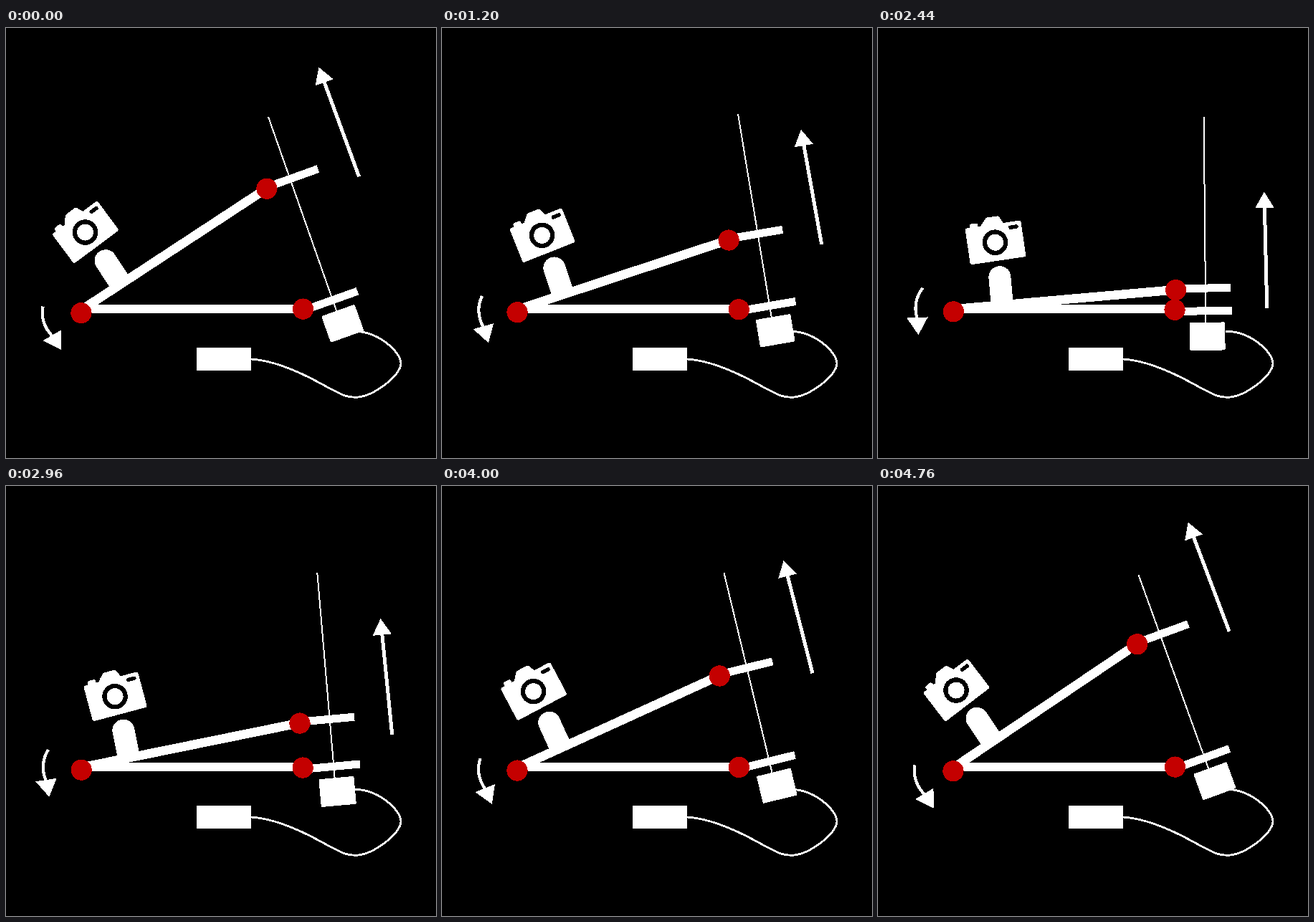
Write an HTML page that moves like this. It is 600 px wide and 600 px high and loops after 4800 ms.

```html
<!DOCTYPE html>
<html lang="en">
<head>
<meta charset="utf-8">
<title>Hinged arm with camera</title>
<style>
  html, body { margin: 0; width: 100%; height: 100%; overflow: hidden; background: #000; }
  svg { display: block; width: 100%; height: 100%; fill: #fff; shape-rendering: crispEdges; }
  .line { fill: none; stroke: #fff; }
  .joint { fill: #c40000; }
  .hole { fill: #000; }
</style>
</head>
<body>
<svg viewBox="0 0 600 600">
  <!-- fixed parts -->
  <rect x="105" y="386" width="309" height="12"/>
  <rect x="266" y="446" width="76" height="32" rx="1.5"/>
  <path class="line" stroke-width="2.8" d="M342 462C375 464 410 480 440 496.5S475 515.3 489 515.3C513 514 551 485 551 468S517 422 485 423.5"/>

  <!-- motor, rod and lower bracket -->
  <g id="lower">
    <path class="line" stroke-width="2" d="M47.9-266.6L46.4 24"/>
    <rect x="24" y="20.3" width="49.2" height="39" rx="1.5"/>
    <rect x="5" y="-1.2" width="78.3" height="11"/>
    <circle class="joint" cx="3.4" cy="2.2" r="14.6"/>
  </g>

  <!-- swinging arm -->
  <g id="arm">
    <rect x="-3" y="-11.7" width="311" height="12.6"/>
    <path d="M49.7-6V-44.3a15.5 15.5 0 0 1 31 0V-6z"/>
    <g transform="translate(63.1 -93.1) rotate(-3.4)">
      <rect x="-38.8" y="-25.4" width="78.5" height="51.2" rx="3"/>
      <rect x="-32" y="-30.4" width="11.5" height="9" rx="3"/>
      <path d="M-18-24L-13.5-29.5L-9-34.5Q-8-36-6-36H8Q10-36 11-34L15.5-24z"/>
      <rect class="hole" x="21.5" y="-20.4" width="13.6" height="5.4" rx="2.5"/>
      <circle class="hole" r="17.8"/>
      <circle r="11.5"/>
    </g>
    <path class="line" stroke-width="4.2" d="M-43-38.8Q-59-22-54.8 3"/>
    <path d="M-69.2 1L-39.5 2.5L-54.8 26z"/>
    <circle class="joint" cx="-3.3" cy="-2" r="14.6"/>
    <!-- upper bracket and direction arrow -->
    <g id="upper">
      <rect x="5" y="-7.4" width="71.6" height="11"/>
      <path class="line" stroke-width="5" d="M126.8 27.5L125.5-115"/>
      <path d="M125.3-135.2L138.8-112.6H112.2z"/>
      <circle class="joint" r="14.6"/>
    </g>
  </g>
</svg>
<script>
  const STEP = 40, STEPS = 120, LOW = 58.75;
  const el = id => document.getElementById(id);
  const lower = el("lower"), arm = el("arm"), upper = el("upper");

  const place = (node, x, y, deg) =>
    node.setAttribute("transform", `translate(${x} ${y}) rotate(${deg})`);

  function draw(ms) {
    const away = Math.abs(Math.floor(ms / STEP) % STEPS - LOW);
    const swing = 3.88 + away / 2;
    const tilt = 0.08 + away / 3;
    place(lower, 410.6, 391.2, -tilt);
    place(arm, 108.8, 397.5, -swing);
    place(upper, 308.4, -5.06, swing - tilt);
  }

  const start = performance.now();
  function tick() {
    draw(performance.now() - start);
    requestAnimationFrame(tick);
  }
  tick();
</script>
</body>
</html>
```
